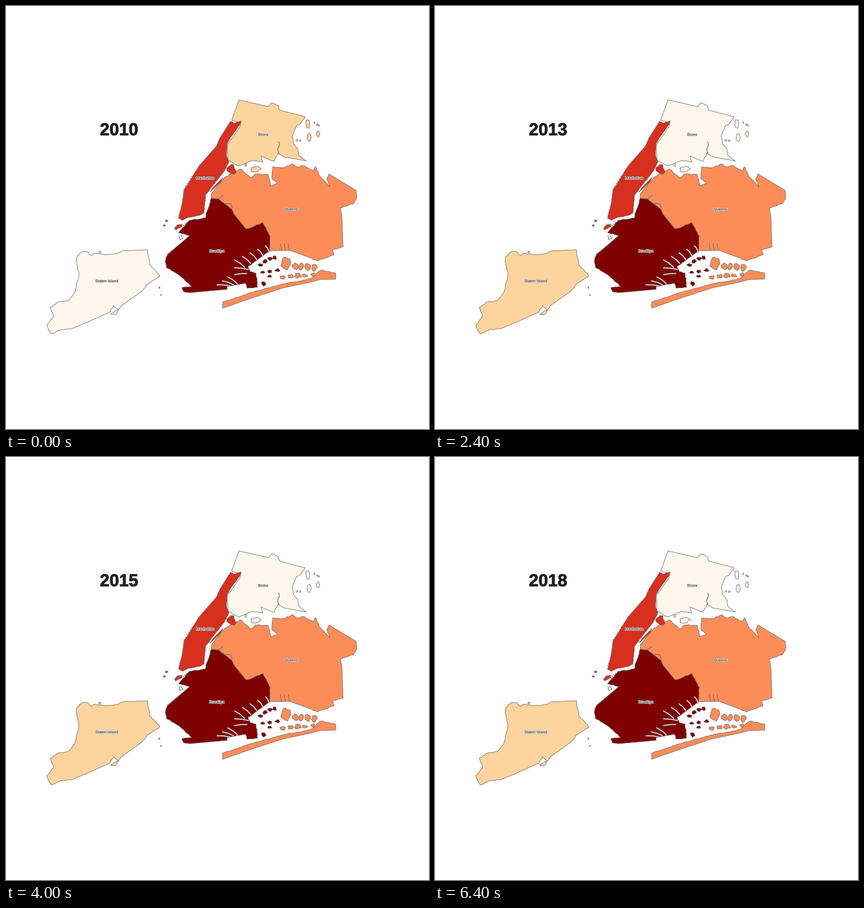
These frames come from a looping animation (748x748 px, 7200 ms). A matplotlib script:

```python
import numpy as np
import matplotlib.pyplot as plt
from matplotlib.animation import FuncAnimation
from matplotlib.patches import Polygon
from matplotlib.patheffects import Normal, Stroke

SIZE, DPI = 748, 100
PX = 72 / DPI
EDGE = "#6a6a6a"
INK = "#231f20"
rng = np.random.default_rng(4)

FIVE = ["#fff7ec", "#fdd49e", "#fc8d59", "#d7301f", "#7f0000"]
FOUR = ["#fff7ec", "#fdc38d", "#e7533a", "#7f0000"]

# Colour ranks: Staten Island, Bronx, Queens, Manhattan, Brooklyn
USUAL = (FIVE, (1, 0, 2, 3, 4))
LOOKS = {
    2010: (FIVE, (0, 1, 2, 3, 4)),
    2011: (FIVE, (0, 1, 3, 2, 4)),
    2014: (FOUR, (1, 0, 1, 2, 3)),
    2017: (FIVE, (0, 1, 2, 4, 3)),
}
YEARS = range(2010, 2019)


def coast(points, amp=0.8):
    """Join key points; short edges wander like a shore, long ones stay straight."""
    path = [np.array(points[0], float)]
    for a, b in zip(points, points[1:]):
        a, b = np.array(a, float), np.array(b, float)
        length = np.hypot(*(b - a))
        steps = int(length // 4) + 1 if length < 33 else 1
        for k in range(1, steps):
            path.append(a + (b - a) * k / steps + rng.uniform(-amp, amp, 2))
        path.append(b)
    return path


def blob(x, y, rx, ry, n=11):
    """Ragged islet around a centre."""
    angle = np.linspace(0, 2 * np.pi, n, endpoint=False)
    r = rng.uniform(0.65, 1.2, n)
    return list(zip(x + rx * r * np.cos(angle), y + ry * r * np.sin(angle)))


def islets(start, end, count, rx, ry, spread=1.5):
    """Row of islets along a line."""
    centres = np.linspace(start, end, count) + rng.uniform(-spread, spread, (count, 2))
    return [blob(x, y, rx * rng.uniform(0.7, 1.2), ry * rng.uniform(0.7, 1.2))
            for x, y in centres]


def sand_bar():
    """Long spit: a centre line and its half width, both eased along x."""
    x = np.linspace(383, 583, 60)
    mid = np.interp(x, [383, 430, 490, 540, 556, 583], [529, 513, 495, 485, 475, 478])
    half = np.interp(x, [383, 430, 490, 540, 556, 583], [5.5, 5, 3.5, 3, 8.5, 5])
    top = mid - half + rng.uniform(-0.7, 0.7, x.size)
    return list(zip(x, top)) + list(zip(x, mid + half))[::-1]


staten = coast([
    (72, 564), (84, 549), (78, 533), (91, 524), (110, 521), (122, 506), (129, 476),
    (124, 452), (126, 442), (135, 434), (144, 434), (151, 441), (157, 437),
    (176, 440), (197, 438), (205, 433), (250, 431), (252, 445), (255, 458),
    (272, 477), (251, 491), (239, 505), (204, 530), (193, 546), (185, 545),
    (198, 537), (190, 530), (184, 541), (142, 560), (116, 571), (97, 572),
    (80, 580), (72, 564),
])
bronx = coast([
    (412, 166), (464, 178), (470, 171), (481, 176), (484, 184), (529, 196),
    (520, 209), (514, 211), (506, 231), (509, 244), (516, 252), (518, 264),
    (531, 274), (492, 267), (481, 260), (474, 275), (451, 265), (454, 276),
    (436, 273), (411, 283), (392, 272), (391, 246), (414, 213), (416, 206),
    (399, 202), (412, 166),
], 0.6)
manhattan = coast([
    (397, 204), (403, 207), (416, 203), (413, 211), (399, 230), (391, 243),
    (390, 264), (394, 276), (386, 292), (367, 316), (353, 334), (350, 366),
    (343, 370), (322, 374), (312, 379), (305, 375), (312, 347), (315, 325),
    (329, 303), (343, 281), (372, 248), (378, 234), (397, 204),
], 0.4)
border = coast([
    (363, 340), (375, 341), (399, 359), (403, 368), (424, 394), (431, 393),
    (454, 383), (467, 407), (466, 433),
], 0.5)
queens_shore = coast([
    (466, 433), (502, 432), (537, 445), (550, 451), (580, 440), (577, 432),
    (596, 426), (594, 372), (591, 357), (614, 350), (620, 340), (619, 326),
    (571, 297), (567, 306), (573, 320), (553, 298), (547, 284), (544, 291),
    (526, 282), (516, 285), (507, 279), (491, 286), (471, 285), (470, 304),
    (480, 314), (468, 318), (464, 298), (441, 297), (434, 304), (414, 288),
    (387, 303), (363, 332),
])
brooklyn_shore = coast([
    (466, 433), (436, 455), (428, 460), (432, 470), (442, 472), (445, 497),
    (426, 499), (423, 490), (409, 492), (391, 496), (391, 501), (324, 507),
    (314, 505), (311, 498), (329, 496), (305, 475), (284, 463), (282, 450),
    (286, 439), (325, 406), (305, 401), (324, 379), (352, 375), (356, 362),
    (363, 340),
])

sound = blob(441, 288, 10, 5) + []
shapes = [
    [staten, blob(166, 435, 2, 1.5), blob(271, 498, 1, 1.5), blob(274, 511, 1, 1)],
    [bronx, sound, blob(424, 281, 2, 2.5), blob(534, 208, 4, 8), blob(536, 232, 4, 9),
     blob(552, 226, 3, 5)] + islets((546, 207), (554, 212), 3, 1, 1.5, 1)
    + islets((514, 237), (520, 238), 2, 2, 1.5, 0.5),
    [border + queens_shore, sand_bar()]
    + [blob(495, 455, 8, 14)]
    + islets((510, 461), (545, 462), 4, 5, 8)
    + islets((488, 481), (543, 474), 5, 6, 4),
    [manhattan, blob(399, 289, 8, 8),
     [(384, 303), (380, 311), (361, 329), (366, 321)],
     [(298, 393), (303, 387), (311, 386), (311, 390), (300, 396)],
     blob(284, 380, 2.5, 1.5), blob(280, 388, 2, 1.5)],
    [border + brooklyn_shore]
    + islets((449, 457), (475, 444), 4, 5, 3.5)
    + islets((453, 471), (480, 468), 3, 4, 3, 1)
    + [blob(456, 491, 4, 4.5), blob(466, 478, 4, 2.5)],
]


def add_land(points):
    land = Polygon(points, closed=True, ec=EDGE, lw=0.85 * PX, joinstyle="round")
    return ax.add_patch(land)


def draw_line(points, color, width):
    ax.plot(*zip(*points), color=color, lw=width * PX, solid_capstyle="round")


def draw_piers(start, end, count, reach):
    for foot in np.linspace(start, end, count):
        draw_line([foot, foot + reach], EDGE, 1)


def draw_inlets(start, end, count, first, last):
    """Narrow water cut into the land, its course turning from first to last."""
    courses = np.linspace(first, last, count)
    for head, course in zip(np.linspace(start, end, count), courses):
        path = [head, head + course * 0.5 + (0.8, -0.8), head + course]
        draw_line(path, EDGE, 2.4)
        draw_line(path, "white", 1.2)


fig = plt.figure(figsize=(SIZE / DPI, SIZE / DPI), dpi=DPI, facecolor="white")
ax = fig.add_axes([0, 0, 1, 1])
ax.set_xlim(0, SIZE)
ax.set_ylim(SIZE, 0)
ax.axis("off")

lands = [[add_land(p) for p in group] for group in shapes]

draw_inlets((404, 449), (459, 424), 5, (18, 13), (6, 11))
draw_inlets((404, 463), (404, 475), 2, (25, 3), (22, -2))
draw_inlets((373, 493), (392, 479), 3, (23, 2), (17, 12))

draw_piers((314, 344), (316, 324), 6, (-2, -1))
draw_piers((319, 319), (330, 302), 5, (-2, -1))
draw_piers((307, 370), (311, 357), 4, (-2, -1))
draw_piers((298, 431), (287, 439), 5, (-2, -1))
draw_piers((320, 385), (312, 391), 4, (-2, -2))
draw_piers((485, 420), (499, 420), 3, (2, 12))

bend = np.linspace(0, 1, 12)
draw_line(list(zip(482 + 1.5 * np.sin(7 * bend), 240 + 21 * bend)), EDGE, 1.2)
draw_line([(363, 340), (376, 341), (384, 335)], EDGE, 1.1)
draw_line([(388, 349), (398, 350), (400, 357)], EDGE, 1.1)
draw_line([(306, 405), (307, 413), (313, 411), (309, 405)], EDGE, 1)

labels = {
    "Staten Island": (178, 486),
    "Bronx": (455, 227),
    "Queens": (504.5, 359),
    "Manhattan": (352, 304),
    "Brooklyn": (373, 433),
}
for name, (x, y) in labels.items():
    ax.text(x, y, name, family="Liberation Sans", size=6.9 * PX, color=INK,
            ha="center", va="center_baseline",
            path_effects=[Stroke(linewidth=1.4 * PX, foreground="#e4e4e4"), Normal()])

year_text = ax.text(166, 228.5, "", family="Liberation Sans", weight="bold",
                    size=30.5 * PX, color=INK, ha="left", va="baseline",
                    path_effects=[Stroke(linewidth=0.9 * PX, foreground=INK), Normal()])


def update(i):
    year = YEARS[i]
    palette, ranks = LOOKS.get(year, USUAL)
    year_text.set_text(str(year))
    for group, rank in zip(lands, ranks):
        for land in group:
            land.set_facecolor(palette[rank])
    return [year_text]


anim = FuncAnimation(fig, update, frames=len(YEARS), interval=800, repeat=True,
                     repeat_delay=0, blit=False)
plt.show()
```
